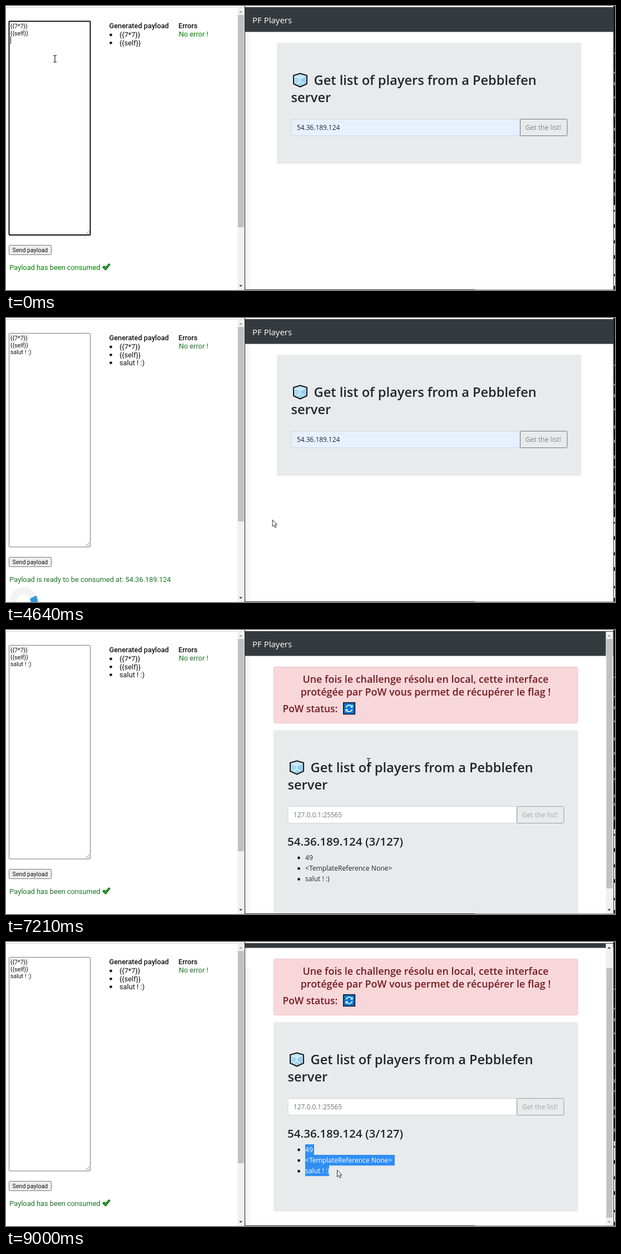
Recreate the animation shown at these times as an HTML page. Size 1095 px wide and 511 px high, loop 9.08 s.

```html
<!DOCTYPE html>
<html lang="en">
<head>
<meta charset="utf-8">
<title>Payload demo</title>
<style>
html, body { margin: 0; width: 100%; height: 100%; overflow: hidden; background: #fff; }
svg { display: block; width: 100vw; height: 100vh; }
text { white-space: pre; }
.rob { font-family: Roboto, sans-serif; font-size: 12.8px; fill: #111; }
.small { font-size: 10.67px; }
.open { font-family: "Open Sans", sans-serif; font-size: 12.1px; fill: #212529; }
.semi { font-weight: 600; }
.title { font-size: 23.6px; }
.count { font-size: 20.6px; }
.alert { fill: #721c24; font-size: 17.9px; }
.status { font-size: 17.4px; }
.ok { fill: #008000; }
</style>
</head>
<body>
<svg id="stage" viewBox="0 0 1095 511"></svg>
<script>
const LOOP = 9080;
const stage = document.getElementById('stage');
const $ = id => document.getElementById(id);

// Markup helpers
const rect = (x, y, w, h, fill, more = '') =>
  `<rect x="${x}" y="${y}" width="${w}" height="${h}" fill="${fill}" ${more}/>`;
const path = (d, fill, more = '') => `<path d="${d}" fill="${fill}" ${more}/>`;
const text = (x, y, str, cls, more = '') =>
  `<text x="${x}" y="${y}" class="${cls}" ${more}>${str.replace(/</g, '&lt;')}</text>`;
const dot = (x, y, r = 2.4) => `<circle cx="${x}" cy="${y}" r="${r}" fill="#111"/>`;
const group = (id, body, more = '') => `<g id="${id}" ${more}>${body}</g>`;

const iceCube = (x, y) => `<g transform="translate(${x} ${y})">
  ${path('M2 5L14 1.5L26 5V20L14 25.5L2 20Z', '#c4e6f8', 'stroke="#15191c" stroke-width="2" stroke-linejoin="round"')}
  ${path('M3.5 6.5L14 10V23.8L3.5 19.2Z', '#a8d8f3')}
  ${path('M14 10L24.5 6.5V19.2L14 23.8Z', '#98cdef')}
  ${path('M4 6.5L14 10L24 6.5M14 10V17M14 16L8 20M14 16L20 20', 'none', 'stroke="#eefaff" stroke-width="1.3"')}</g>`;

function form(x, y, h, value, opt) {
  const ix = x + 26, iy = y + 137.5, bx = x + 437.5;
  return rect(x, y, 547.5, h, '#e8ebec', 'rx="4"') +
    iceCube(x + 28, y + 54) +
    text(x + 66.5, y + 76, 'Get list of players from a Pebblefen', 'open semi title') +
    text(x + 25.5, y + 107, 'server', 'open semi title') +
    rect(ix, iy, 412, 30, opt.field, 'rx="3" stroke="#ced4da"') +
    text(ix + 10, y + 157, value, 'open', `style="font-size:11.85px;fill:${opt.ink}"`) +
    group(opt.id, rect(bx, iy, 84.5, 30, '#6c757d', 'fill-opacity="0" rx="2" stroke="#6c757d"') +
      text(bx + 9.5, y + 157, 'Get the list!', 'open', 'style="fill:#7b848a"'),
      `opacity="${opt.fade}"`);
}

function scrollbar(x, id, h) {
  const cx = x + 6;
  return rect(x, 3, 13, 508, '#f1f1f1') +
    rect(x + 1, 16, 11, h, '#c1c1c1', `id="${id}"`) +
    path(`M${cx - 3} 12L${cx} 8.5L${cx + 3} 12Z`, '#a3a3a3', `id="${id}Up"`) +
    path(`M${cx - 3} 502L${cx} 505.5L${cx + 3} 502Z`, '#505050', `id="${id}Down"`);
}

function leftWindow() {
  const lines = ['{{7*7}}', '{{self}}', ''];
  return rect(0, 2, 430, 1, '#d4d4d4') +
    rect(5.5, 27.5, 146, 384.5, '#fff', 'id="area" rx="1"') +
    path('M143.5 410.5L150 404M147.5 410.5L150 408', 'none', 'stroke="#777" stroke-width=".9"') +
    lines.map((s, i) => text(7.8, 40 + i * 12.6, s, 'rob small', `id="line${i}"`)).join('') +
    rect(8, 55, 1, 13, '#000', 'id="caret"') +
    text(185.5, 40, 'Generated payload', 'rob', 'font-weight="500"') +
    text(310, 40, 'Errors', 'rob', 'font-weight="500"') +
    text(310.7, 55, 'No error !', 'rob ok') +
    dot(188.5, 52) + text(204, 56, '{{7*7}}', 'rob') +
    dot(188.5, 66.3) + text(204, 71, '{{self}}', 'rob') +
    group('added', dot(188.5, 80.7) + text(204, 85, 'salut ! :)', 'rob')) +
    rect(5.5, 430.5, 76, 17, '#efefef', 'id="send" rx="2" stroke="#767676"') +
    text(11.6, 443, 'Send payload', 'rob small') +
    group('used', text(6.3, 474.5, 'Payload has been consumed', 'rob ok') +
      path('M173.5 470L176.5 467.5L179 470L185 463.5L187.3 465.5L179 475.5Z', '#23a02a', 'stroke="#123d14" stroke-width="1" stroke-linejoin="round"')) +
    group('ready', text(6.3, 474.5, 'Payload is ready to be consumed at: 54.36.189.124', 'rob ok') +
      `<g fill="none" stroke-width="12.8"><circle cx="31.5" cy="510.7" r="19.2" stroke="#f3f3f3"/>
      <path id="arc" d="M17.92 497.12A19.2 19.2 0 0 1 45.08 497.12" stroke="#3498db"/></g>`) +
    scrollbar(416, 'bar', 382);
}

function rightWindow() {
  const navbar = rect(430, 2, 663, 44.6, '#343a3e') +
    text(443, 31, 'PF Players', 'open', 'style="font-size:15px;fill:#fff"');
  const rows = [['49', 16], ['<TemplateReference None>', 161], ['salut ! :)', 43]];
  const list = rows.map(([s, w], i) => dot(526.5, 410 + i * 19.2) +
    rect(538, 400 + i * 19, w, 19.2, '#2f8ef4', `id="mark${i}"`) +
    text(538, 414 + i * 19.1, s, 'open', `id="item${i}"`)).join('');
  const result = rect(481.5, 66.5, 546.5, 101, '#f8d7da', 'rx="3" stroke="#f1c3c8"') +
    text(754.5, 95, 'Une fois le challenge résolu en local, cette interface', 'open semi alert', 'text-anchor="middle"') +
    text(754.5, 118, 'protégée par PoW vous permet de récupérer le flag !', 'open semi alert', 'text-anchor="middle"') +
    text(497.5, 147.5, 'PoW status:', 'open semi alert status') +
    rect(606.8, 130.8, 20.5, 20.5, '#0078d7', 'stroke="#111" stroke-width="1.6"') +
    path('M611.5 139.5A6 6 0 0 1 622 137.5M622.5 142.5A6 6 0 0 1 612 144.5', 'none', 'stroke="#fff" stroke-width="1.6"') +
    path('M623.5 134.5V139.5H618.5ZM610.5 147.5V142.5H615.5Z', '#fff') +
    form(481, 180, 341, '127.0.0.1:25565', { id: 'idle', field: '#fff', ink: '#6c757d', fade: .65 }) +
    text(506, 388, '54.36.189.124 (3/127)', 'open semi count') + list;
  return `<defs><clipPath id="view">${rect(430, 2, 662, 508, '#000')}</clipPath>
    <linearGradient id="shade"><stop stop-color="#000" stop-opacity=".05"/><stop offset="1" stop-opacity="0"/></linearGradient></defs>
    <g clip-path="url(#view)">` +
    group('before', navbar + form(487, 66, 218, '54.36.189.124', { id: 'go', field: '#e7f0fd', ink: '#212529', fade: 1 }) +
      rect(923.3, 202.3, 86.7, 32.4, 'none', 'id="ring" rx="3" stroke="#6c757d" stroke-opacity=".55" stroke-width="2.6"')) +
    group('after', group('page', navbar + result) + scrollbar(1078.5, 'side', 449)) +
    rect(430, 47, 14, 464, 'url(#shade)') + '</g>' +
    rect(429, 0, 1, 511, '#1b1b1b') + rect(430, 510, 413, 1, '#333') + rect(843, 510, 249, 1, '#999');
}

function edge() {
  let seed = 7, out = rect(1092, 0, 1, 511, '#333') + rect(1093, 0, 2, 358, '#0c0c0c') + rect(1093, 358, 2, 153, '#f4f4f4');
  const rnd = () => (seed = seed * 16807 % 2147483647) / 2147483647;
  for (let y = 84; y < 505; y += 14 + rnd() * 22)
    out += rect(1093, y.toFixed(1), 2, (2 + rnd() * 5).toFixed(1), y < 358 ? '#8a8a8a' : '#222');
  return out;
}

const cursors = {
  arrow: path('M.5 .5V12.5L3.3 10L5.2 14.4L7.2 13.5L5.3 9.2H9Z', '#fff', 'stroke="#111" stroke-width=".9"'),
  beam: path('M-3 -6H-1L0 -5.3L1 -6H3M0 -5.3V5.3M-3 6H-1L0 5.3L1 6H3', 'none', 'stroke="#111" stroke-width="1.1"'),
  hand: path('M0 1.2Q1.2 -.6 2.4 1.2V6.5L8 7.6Q9.2 8 9 10L8 14V17H1.5V15L-3 10Q-3.5 8 -1.8 8.3L0 9.8Z', '#fff', 'stroke="#111" stroke-width="1" stroke-linejoin="round"')
};

stage.innerHTML = rect(0, 0, 1095, 511, '#fff') + leftWindow() + rightWindow() + edge() +
  group('mouse', Object.entries(cursors).map(([k, v]) => group(k, v)).join(''));

// Screen updates come in bursts: start, end, number of steps
const bursts = [[2370, 3220, 12], [3880, 3950, 2], [4110, 4960, 12], [5030, 5880, 12], [5970, 6660, 10],
  [6820, 7670, 12], [7740, 8130, 6], [8300, 8600, 5], [8770, 9000, 4]];

function snap(t) {
  let at = 0;
  for (const [from, to, n] of bursts) {
    if (t < from) break;
    const gap = (to - from) / (n - 1);
    at = Math.min(to, from + Math.floor((t - from + 15) / gap) * gap);
  }
  return at;
}

// Pointer path: time, x, y, shape
const moves = [
  [0, 88, 95, 'beam'], [2300, 88, 95, 'beam'], [2700, 105, 230, 'beam'], [2990, 92, 400, 'arrow'],
  [3220, 48, 449, 'arrow'], [4060, 48, 449, 'arrow'], [4500, 330, 400, 'arrow'], [4960, 783, 286, 'arrow'],
  [5260, 930, 225, 'hand'], [5490, 935, 220, 'hand'], [5570, 869, 218, 'beam'], [5870, 928, 216, 'hand'],
  [6120, 970, 218, 'hand'], [6500, 970, 218, 'arrow'], [6750, 970, 218, 'arrow'], [6980, 850, 222, 'arrow'],
  [7200, 652, 237, 'beam'], [7350, 649, 239, 'arrow'], [7670, 637, 276, 'arrow'], [8130, 608, 416, 'arrow'],
  [8230, 608, 416, 'arrow'], [8600, 523, 373, 'arrow'], [8700, 523, 373, 'arrow'], [9000, 595, 410, 'arrow']
];

const typed = 'salut ! :)';
const keyTimes = [660, 810, 900, 1060, 1130, 1130, 1300, 1450, 1620, 1710];
const caretX = [8, 13, 19, 21, 27, 31, 33, 36, 39, 41, 44];

const set = (id, attrs) => { for (const k in attrs) $(id).setAttribute(k, attrs[k]); };
const show = (id, on) => set(id, { display: on ? 'inline' : 'none' });
const clamp = v => Math.max(0, Math.min(1, v));

function moveMouse(s) {
  let i = moves.length - 1;
  while (moves[i][0] > s) i--;
  const [t0, x0, y0, kind] = moves[i], [t1, x1, y1] = moves[i + 1] || [t0 + 1, x0, y0];
  const p = clamp((s - t0) / (t1 - t0));
  set('mouse', { transform: `translate(${x0 + (x1 - x0) * p} ${y0 + (y1 - y0) * p})` });
  for (const k in cursors) show(k, k === kind);
}

function drawLeft(t, s) {
  const n = keyTimes.filter(k => k <= t).length;
  const sent = t >= 3540, waiting = s >= 4110 && s < 6500;
  $('line2').textContent = typed.slice(0, n);
  set('caret', { x: caretX[n] });
  show('caret', !sent && !(t >= 320 && t < 660) && !(t >= 2200 && s < 2720));
  set('area', sent ? { stroke: '#767676', 'stroke-width': 1 } : { stroke: '#101010', 'stroke-width': 2 });
  const over = s >= 3130 && s < 4180, down = sent && t < 3880;
  set('send', { fill: over ? '#e6e6e6' : '#efefef', stroke: down || over ? '#4f4f4f' : '#767676' });
  show('added', sent);
  document.querySelectorAll('.ok').forEach(e => e.style.fill = sent ? '#1c7426' : '#008000');
  show('used', !waiting);
  show('ready', waiting);
  set('arc', { transform: `rotate(${(s - 4050) * .18} 31.5 510.7)` });
  set('bar', { height: waiting ? 350 : 382 });
}

function drawRight(s) {
  const loaded = s >= 6500;
  show('before', !loaded);
  show('after', loaded);

  const first = clamp((s - 5260) / 150) * (s >= 5560 ? clamp((5584 - s) / 110) : 1);
  const hover = Math.max(first, clamp((s - 5860) / 150));
  const [bg, label] = $('go').children;
  bg.setAttribute('fill-opacity', hover);
  label.style.fill = hover > .5 ? '#fff' : '#7b848a';
  show('ring', s >= 6190);

  const scroll = 36 * (1 - (1 - clamp((s - 7261) / 200)) ** 1.5);
  set('page', { transform: `translate(0 ${-Math.round(scroll)})` });
  set('side', { y: 16 + scroll * .86 });
  set('sideUp', { fill: scroll > 0 ? '#505050' : '#a3a3a3' });
  set('sideDown', { fill: scroll < 36 ? '#505050' : '#a3a3a3' });
  [8590, 8440, 8300].forEach((from, i) => {
    show('mark' + i, s >= from);
    $('item' + i).style.fill = s >= from ? '#fff' : '#212529';
  });
}

function draw(t) {
  const s = snap(t);
  drawLeft(t, s);
  drawRight(s);
  moveMouse(s);
}

const start = performance.now();
function tick() {
  draw((performance.now() - start) % LOOP);
  requestAnimationFrame(tick);
}
tick();
</script>
</body>
</html>
```
